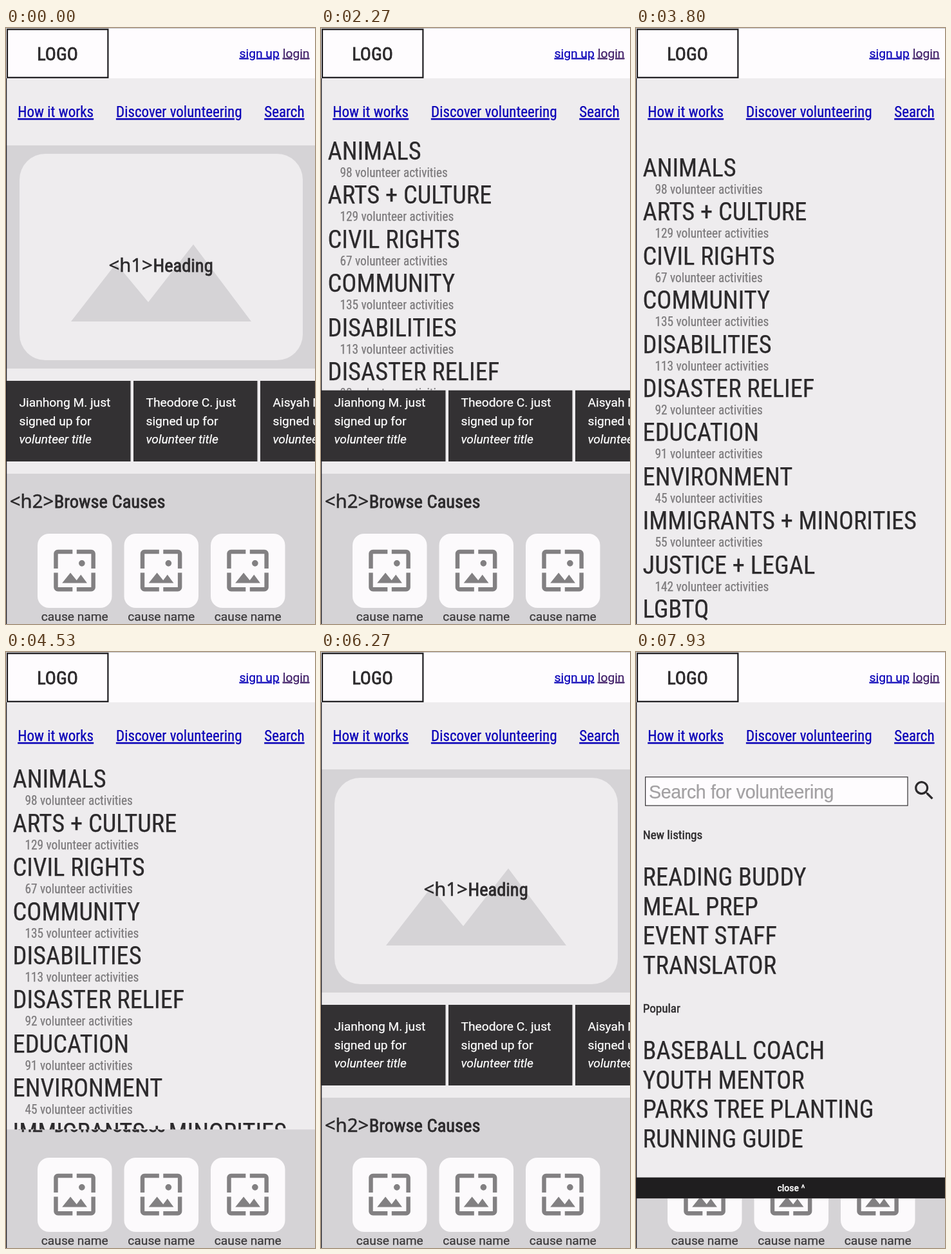
Animation, 480 px wide and 924 px high, one loop 8000 ms. Source, as an HTML page:

```html
<!DOCTYPE html>
<html lang="en">
<head>
<meta charset="utf-8">
<title>Volunteer wireframe</title>
<style>
  html, body { margin: 0; height: 100%; overflow: hidden; background: #eeecee; }
  svg { display: block; width: 100vw; height: 100vh; }
  text { font-family: Roboto, sans-serif; white-space: pre; stroke-width: .25px; }
  .cond { font-family: "Roboto Condensed", Roboto, sans-serif; font-stretch: 75%; }
  .tag { font-family: "Noto Sans", sans-serif; stroke-width: .5px; }
  .field { font-family: "Liberation Sans", sans-serif; letter-spacing: -.37px; }
  .link { text-decoration: underline; }
  .heavy { stroke-width: .8px; }
  .semi { stroke-width: .5px; }
</style>
</head>
<body>
<svg id="stage" viewBox="0 0 480 924" preserveAspectRatio="none"></svg>
<script>
const NS = 'http://www.w3.org/2000/svg';
const stage = document.getElementById('stage');
const INK = '#2c2a2c', PALE = '#eeecee', GREY = '#d5d3d6', WHITE = '#fefcfe',
      MID = '#7c7a7c', LINK = '#0a02b8';
const LOOP = 8000, SLIDE = 600, TOP = 182, PAD = 39.7;
const BODY = 19.2, TITLE = 38.4;

function el(parent, name, attrs) {
  const node = document.createElementNS(NS, name);
  for (const key in attrs) node.setAttribute(key, attrs[key]);
  return parent.appendChild(node);
}

const rect = (parent, x, y, width, height, fill, more) =>
  el(parent, 'rect', { x, y, width, height, fill, ...more });

// Use the condensed face when there is one, otherwise narrow the regular face.
function condensedScale() {
  const width = cls => {
    const probe = el(stage, 'text', { class: cls, 'font-size': 40 });
    probe.textContent = 'Discover volunteering';
    const w = probe.getComputedTextLength();
    probe.remove();
    return w;
  };
  return width('cond') < width('') * .97 ? 1 : .885;
}
const narrow = condensedScale();

function text(parent, str, x, y, size, fill = INK, cls = '', more = {}) {
  const k = cls.includes('cond') ? narrow : 1;
  const node = el(parent, 'text', {
    transform: `translate(${x} ${y}) scale(${k} 1)`,
    'font-size': size, fill, stroke: fill, class: cls, ...more
  });
  node.textContent = str;
  return node;
}
const middle = { 'text-anchor': 'middle' };

function drawHeader() {
  rect(stage, 0, 0, 480, 78, WHITE);
  rect(stage, 0, 0, 480, 1, '#c6c4c7');
  rect(stage, 2, 2.2, 156.4, 74.6, WHITE, { stroke: '#1d1c1f', 'stroke-width': 2.2 });
  text(stage, 'LOGO', 80, 49.5, 28.4, INK, 'cond heavy', middle);
  text(stage, 'sign up', 362.6, 45.5, BODY, LINK, 'link');
  text(stage, 'login', 429.8, 45.5, BODY, '#3e1c66', 'link');
  text(stage, 'How it works', 18.3, 138, 23, LINK, 'cond link');
  text(stage, 'Discover volunteering', 171, 138, 23, LINK, 'cond link');
  text(stage, 'Search', 401.3, 138, 23, LINK, 'cond link');
}

function drawHero() {
  rect(stage, 0, TOP, 480, 346, GREY);
  rect(stage, 21, 195, 440, 320, PALE, { rx: 40 });
  el(stage, 'path', { d: 'M101 455L171 365L221 425L291 335.5L381 455Z', fill: GREY });
  text(stage, '<h1>', 159.5, 377.5, 29.3, INK, 'tag');
  text(stage, 'Heading', 228.5, 377.5, 28.5, INK, 'cond heavy');
}

function drawTicker() {
  ['Jianhong M.', 'Theodore C.', 'Aisyah N.'].forEach((name, i) => {
    const x = 1 + i * 197;
    rect(stage, x, 547, 192.5, 125, '#333133');
    text(stage, name + ' just', x + 19.5, 587, BODY, '#fff');
    text(stage, 'signed up for', x + 19.5, 615.7, BODY, '#fff');
    text(stage, 'volunteer title', x + 19.5, 644.3, BODY, '#fff', '', { 'font-style': 'italic' });
  });
}

function drawCauses() {
  const icon = 'M4 4h7V2H4c-1.1 0-2 .9-2 2v7h2V4zm6 9l-4 5h12l-3-4-2.03 2.71L10 13z' +
    'm7-4.5a1.5 1.5 0 1 0-3 0a1.5 1.5 0 1 0 3 0zM20 2h-7v2h7v7h2V4c0-1.1-.9-2-2-2z' +
    'm0 18h-7v2h7c1.1 0 2-.9 2-2v-7h-2v7zM4 13H2v7c0 1.1.9 2 2 2h7v-2H4v-7z';
  rect(stage, 0, 691, 480, 233, GREY);
  text(stage, '<h2>', 5.8, 743.5, 29.3, INK, 'tag');
  text(stage, 'Browse Causes', 74.8, 743.5, 28.5, INK, 'cond heavy');
  for (let i = 0; i < 3; i++) {
    const x = 49 + i * 134.5;
    rect(stage, x, 784, 115.5, 115, '#fcfafc', { rx: 18 });
    el(stage, 'path', { d: icon, fill: '#828082', transform: `translate(${x + 18.8} 802.4) scale(3.23)` });
    text(stage, 'cause name', x + 57.8, 919, BODY, '#3a383a', '', middle);
  }
}

// A sliding drawer: its padding grows together with its height.
function makePanel(id, height, start, end) {
  const clip = el(el(stage, 'clipPath', { id }), 'rect', { x: 0, y: 150, width: 480, height: 0 });
  const box = el(stage, 'g', { 'clip-path': `url(#${id})` });
  rect(box, 0, 150, 480, 774, PALE);
  return { clip, box, body: el(box, 'g', {}), height, start, end };
}

function fillDiscover({ body }) {
  const causes = [
    ['ANIMALS', 98], ['ARTS + CULTURE', 129], ['CIVIL RIGHTS', 67], ['COMMUNITY', 135],
    ['DISABILITIES', 113], ['DISASTER RELIEF', 92], ['EDUCATION', 91], ['ENVIRONMENT', 45],
    ['IMMIGRANTS + MINORITIES', 55], ['JUSTICE + LEGAL', 142], ['LGBTQ', 74]
  ];
  causes.forEach(([name, count], i) => {
    const y = 230 + i * 68.4;
    text(body, name, 10.6, y, TITLE, INK, 'cond');
    text(body, count + ' volunteer activities', 29.5, y + 27, 19.3, MID, 'cond');
  });
}

function fillSearch({ body }) {
  const lens = 'M15.5 14h-.79l-.28-.27A6.5 6.5 0 1 0 13.73 14.43l.27.28v.79l5 4.99L20.49 19l-4.99-5z' +
    'm-6 0a4.5 4.5 0 1 1 0-9a4.5 4.5 0 1 1 0 9z';
  const list = (title, y, names) => {
    text(body, title, 10.8, y, 19.1, INK, 'cond semi');
    names.forEach((name, i) => text(body, name, 10.6, y + 72.5 + i * 45.5, TITLE, INK, 'cond'));
  };
  rect(body, 14.6, 193.8, 407.4, 44.3, WHITE, { stroke: '#333133', 'stroke-width': 1.2 });
  text(body, 'Search for volunteering', 20, 227, 28.6, '#a3a1a3', 'field');
  el(body, 'path', { d: lens, fill: INK, 'fill-rule': 'evenodd', transform: 'translate(428.2 195.2) scale(1.63)' });
  list('New listings', 289.5, ['READING BUDDY', 'MEAL PREP', 'EVENT STAFF', 'TRANSLATOR']);
  list('Popular', 558.5, ['BASEBALL COACH', 'YOUTH MENTOR', 'PARKS TREE PLANTING', 'RUNNING GUIDE']);
  rect(body, 0, 814.6, 480, 33, '#1f1e1f');
  text(body, 'close ^', 241, 835.5, 14, '#fff', '', { ...middle, 'font-weight': 500 });
}

drawHero();
drawTicker();
drawCauses();
const discover = makePanel('discover', 1099, 2031, 4234);
const search = makePanel('search', 665.2, 6649, Infinity);
fillDiscover(discover);
fillSearch(search);
drawHeader();
rect(stage, 0, 78, 1.2, 846, '#1d1c24');

const swing = x => .5 - .5 * Math.cos(Math.PI * Math.min(1, Math.max(0, x)));

function slide(panel, t) {
  const p = swing((t - panel.start) / SLIDE) - swing((t - panel.end) / SLIDE);
  panel.box.setAttribute('display', p > .001 ? 'inline' : 'none');
  panel.clip.setAttribute('height', TOP - 150 + panel.height * p);
  panel.body.setAttribute('transform', `translate(0 ${-PAD * (1 - p)})`);
}

function render(t) {
  slide(discover, t);
  slide(search, t);
}

function tick() {
  render(performance.now() % LOOP);
  requestAnimationFrame(tick);
}
tick();
</script>
</body>
</html>
```
